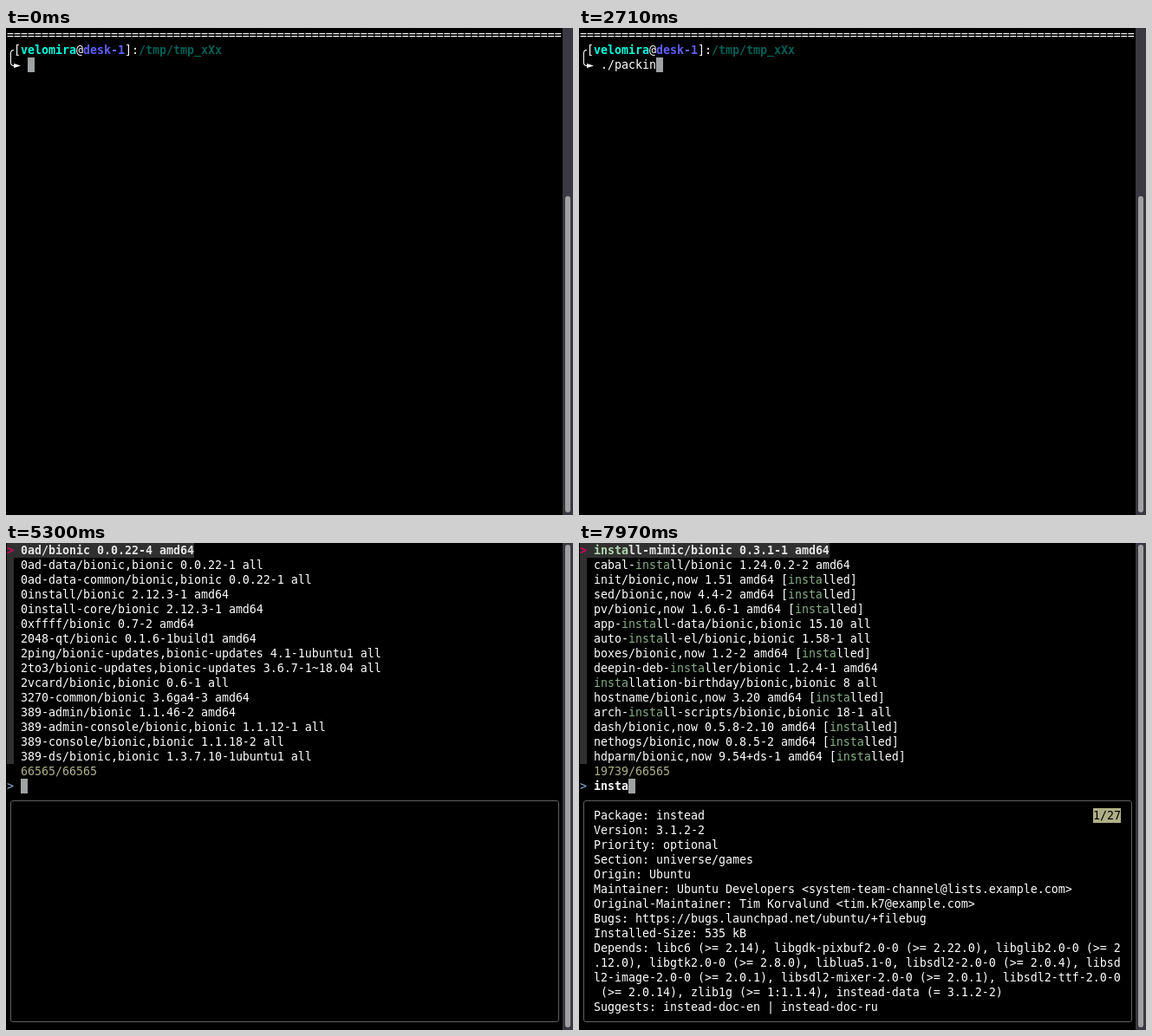
Animation of 654x562 px, one loop 8000 ms. Source, as an HTML page:

```html
<!DOCTYPE html>
<html lang="en">
<head>
<meta charset="utf-8">
<title>Package finder in a terminal</title>
<style>
  html, body { margin: 0; width: 100%; height: 100%; overflow: hidden; background: #000; }
  #stage { position: relative; width: 654px; height: 562px; overflow: hidden; background: #000; color: #fff;
    font: 13.29px/17px "DejaVu Sans Mono", "DejaVu Sans", monospace; font-variant-ligatures: none; }
  #stage div { position: absolute; white-space: pre; }
  b { font-weight: bold; }
  #track { left: 642px; top: 0; width: 12px; height: 562px; background: #3a3841; }
  #thumb { left: 645px; width: 6px; border-radius: 3px; background: #a1a1a1; }
  .hook { left: 5px; top: 25px; width: 4px; height: 17px; box-sizing: content-box;
    border: 1px solid #fff; border-right: 0; border-radius: 4px 0 0 4px; width: 3px; }
  .user { color: #00ffdf; }
  .host { color: #5f5fff; }
  .path { color: #005f57; }
  .cursor { width: 8px; height: 17px; background: #9fa2a3; }
  .gutter { left: 1px; top: 0; width: 8px; height: 255px; background: #303030; }
  .current { background: #303030; color: #e4e4e4; font-weight: bold; }
  .pointer { color: #d7005f; }
  .match { color: #87af87; }
  .current .match { color: #afd7af; }
  .info { color: #afaf87; }
  .spinner { color: #afd700; }
  .prompt { color: #87afd7; }
  .frame { left: 5px; top: 297px; width: 631px; height: 254px; border: 1px solid #5f5f5f; border-radius: 3px; }
  .badge { background: #afaf87; color: #000; }
</style>
</head>
<body>
<div id="stage">
  <div id="screen"></div>
  <div id="track"></div>
  <div id="thumb"></div>
</div>
<script>
const LOOP = 8000;
const RUN = 3330, FINDER = 3800, LOADED = 4900, FIRST_PREVIEW = 5400, NEXT_PREVIEW = 7560;
const BLINK = 600;

const command = { text: './packin.sh', keys: [560, 1150, 1500, 1850, 2120, 2320, 2500, 2660, 2820, 2980, 3140] };
const query = { text: 'insta', keys: [6640, 6900, 7130, 7360, 7700] };

const allPackages = `0ad/bionic 0.0.22-4 amd64
0ad-data/bionic,bionic 0.0.22-1 all
0ad-data-common/bionic,bionic 0.0.22-1 all
0install/bionic 2.12.3-1 amd64
0install-core/bionic 2.12.3-1 amd64
0xffff/bionic 0.7-2 amd64
2048-qt/bionic 0.1.6-1build1 amd64
2ping/bionic-updates,bionic-updates 4.1-1ubuntu1 all
2to3/bionic-updates,bionic-updates 3.6.7-1~18.04 all
2vcard/bionic,bionic 0.6-1 all
3270-common/bionic 3.6ga4-3 amd64
389-admin/bionic 1.1.46-2 amd64
389-admin-console/bionic,bionic 1.1.12-1 all
389-console/bionic,bionic 1.1.18-2 all
389-ds/bionic,bionic 1.3.7.10-1ubuntu1 all`.split('\n');

const installMatches = `install-mimic/bionic 0.3.1-1 amd64
cabal-install/bionic 1.24.0.2-2 amd64
init/bionic,now 1.51 amd64 [installed]
sed/bionic,now 4.4-2 amd64 [installed]
pv/bionic,now 1.6.6-1 amd64 [installed]
app-install-data/bionic,bionic 15.10 all
auto-install-el/bionic,bionic 1.58-1 all
boxes/bionic,now 1.2-2 amd64 [installed]
deepin-deb-installer/bionic 1.2.4-1 amd64
installation-birthday/bionic,bionic 8 all
hostname/bionic,now 3.20 amd64 [installed]
arch-install-scripts/bionic,bionic 18-1 all
dash/bionic,now 0.5.8-2.10 amd64 [installed]
nethogs/bionic,now 0.8.5-2 amd64 [installed]
hdparm/bionic,now 9.54+ds-1 amd64 [installed]`.split('\n');

const insteadMatches = ['instead/bionic 3.1.2-2 amd64', 'instead-data/bionic,bionic 3.1.2-2 all',
  ...installMatches.slice(0, 13)];

const indentMatches = `inn/bionic 1:1.7.2q-45build2 amd64
indi-bin/bionic 1.7.1+dfsg-1 amd64
indent/bionic 2.2.11-5 amd64
inkscape/bionic 0.92.3-1 amd64
info/bionic,now 6.5.0.dfsg.1-2 amd64 [installed]`.split('\n').concat(installMatches.slice(0, 10));

// Indexed by the number of typed query characters.
const results = [
  [allPackages, 66565], [indentMatches, 66565], [indentMatches, 66565],
  [insteadMatches, 31482], [insteadMatches, 24106], [installMatches, 19739],
];

const previews = {
  first: { badge: '1/23', text: `Package: 0ad
Version: 0.0.22-4
Priority: optional
Section: universe/games
Origin: Ubuntu
Maintainer: Ubuntu Developers <system-team-channel@lists.example.com>
Original-Maintainer: Debian Games Team <app-play-team@lists.archive.example.
org>
Bugs: https://bugs.launchpad.net/ubuntu/+filebug
Installed-Size: 19,7 MB
Pre-Depends: dpkg (>= 1.15.6~)
Depends: 0ad-data (>= 0.0.22), 0ad-data (<= 0.0.22-4), 0ad-data-common (>= 0
.0.22), 0ad-data-common (<= 0.0.22-4), libboost-filesystem1.65.1, libboost-s
ystem1.65.1, libc6 (>= 2.15), libcurl3-gnutls (>= 7.16.2), libenet7, libgcc1` },
  next: { badge: '1/27', text: `Package: instead
Version: 3.1.2-2
Priority: optional
Section: universe/games
Origin: Ubuntu
Maintainer: Ubuntu Developers <system-team-channel@lists.example.com>
Original-Maintainer: Tim Korvalund <tim.k7@example.com>
Bugs: https://bugs.launchpad.net/ubuntu/+filebug
Installed-Size: 535 kB
Depends: libc6 (>= 2.14), libgdk-pixbuf2.0-0 (>= 2.22.0), libglib2.0-0 (>= 2
.12.0), libgtk2.0-0 (>= 2.8.0), liblua5.1-0, libsdl2-2.0-0 (>= 2.0.4), libsd
l2-image-2.0-0 (>= 2.0.1), libsdl2-mixer-2.0-0 (>= 2.0.1), libsdl2-ttf-2.0-0
 (>= 2.0.14), zlib1g (>= 1:1.1.4), instead-data (= 3.1.2-2)
Suggests: instead-doc-en | instead-doc-ru` },
};

const escapeHtml = s => s.replace(/&/g, '&amp;').replace(/</g, '&lt;').replace(/>/g, '&gt;');
const span = (cls, s) => `<span class="${cls}">${escapeHtml(s)}</span>`;
const bold = (cls, s) => `<b class="${cls}">${escapeHtml(s)}</b>`;

// Places markup on the 8 x 17 character grid.
const at = (col, row, html, cls = '') =>
  `<div class="${cls}" style="left:${1 + col * 8}px;top:${row * 17}px">${html}</div>`;
const cursor = (col, row) => at(col, row, '', 'cursor');

const typedCount = ({ keys }, t) => keys.filter(k => k <= t).length;
const blinkOn = (t, since) => Math.floor((t - since) / BLINK) % 2 === 0;

function highlight(line, needle) {
  const i = needle ? line.indexOf(needle) : -1;
  if (i < 0) return escapeHtml(line);
  const end = i + needle.length;
  return escapeHtml(line.slice(0, i)) + span('match', line.slice(i, end)) + escapeHtml(line.slice(end));
}

function shellView(t) {
  const n = typedCount(command, t);
  const lastKey = n ? command.keys[n - 1] : 0;
  return at(0, 0, '='.repeat(80))
    + '<div class="hook"></div>'
    + at(1, 1, '[' + bold('user', 'velomira') + '@' + bold('host', 'desk-1') + ']:' + bold('path', '/tmp/tmp_xXx'))
    + at(1, 2, '►')
    + at(3, 2, command.text.slice(0, n))
    + (t < RUN && blinkOn(t, lastKey) ? cursor(3 + n, 2) : '');
}

function listView(t, n, typed) {
  const [lines, count] = results[n];
  const lastKey = n ? query.keys[n - 1] : LOADED;
  const rows = lines.map((line, i) => i
    ? at(2, i, highlight(line, typed))
    : at(0, 0, span('pointer', '>') + ' ' + highlight(line, typed), 'current'));
  return '<div class="gutter"></div>' + rows.join('')
    + at(2, 15, span('info', count + '/66565'))
    + (blinkOn(t, lastKey) ? cursor(2 + n, 16) : '');
}

function previewView({ badge, text }) {
  return at(2, 18, escapeHtml(text)) + at(74, 18, badge, 'badge');
}

function finderView(t) {
  const n = typedCount(query, t);
  const typed = query.text.slice(0, n);
  let html = '<div class="frame"></div>' + at(0, 16, span('prompt', '>')) + at(2, 16, bold('', typed));
  if (t < LOADED) {
    const step = (Math.floor(t / 200) + 5) % 10;
    return html + at(0, 15, span('spinner', '⠋⠙⠹⠸⠼⠴⠦⠧⠇⠏'[step])) + at(2, 15, span('info', '0/0'));
  }
  html += listView(t, n, typed);
  if (t >= FIRST_PREVIEW) html += previewView(t < NEXT_PREVIEW ? previews.first : previews.next);
  return html;
}

const screenEl = document.getElementById('screen');
const thumb = document.getElementById('thumb');
const start = performance.now();
let shown = '';

function render(now) {
  const t = Math.max(0, now - start) % LOOP;
  const inShell = t < FINDER;
  const html = inShell ? shellView(t) : finderView(t);
  if (html !== shown) {
    screenEl.innerHTML = shown = html;
    const top = inShell ? 194 : 2;
    thumb.style.top = top + 'px';
    thumb.style.height = 559 - top + 'px';
  }
  requestAnimationFrame(render);
}
render(start);
</script>
</body>
</html>
```
